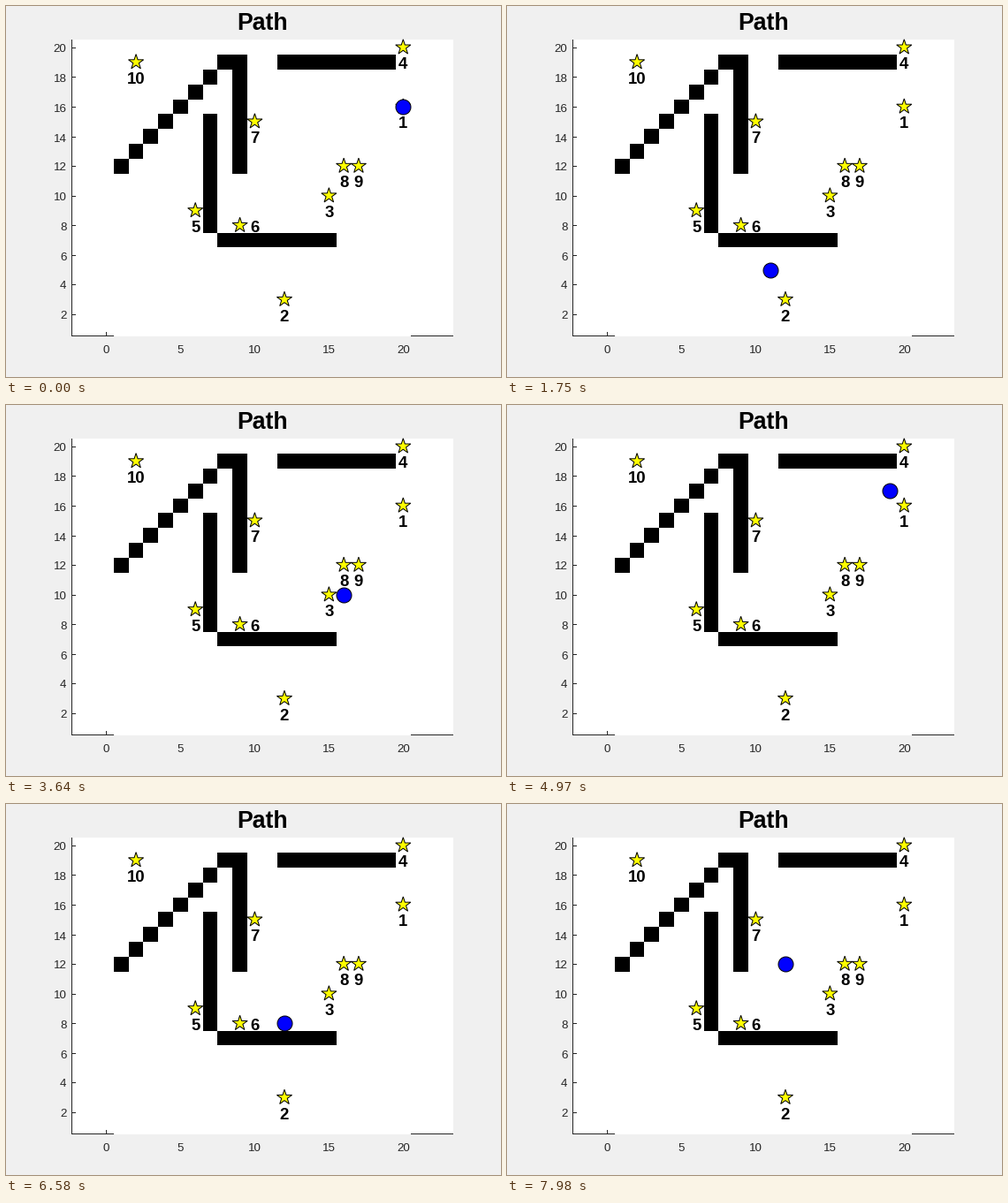
A matplotlib script that plays this animation: 560x420 px, repeating every 8000 ms.

```python
import numpy as np
import matplotlib.pyplot as plt
from matplotlib.animation import FuncAnimation
from matplotlib.patches import Polygon, Rectangle

W, H, DPI = 560, 420, 100
LOOP_MS, TICK_MS, STEP_MS = 8000, 20, 70
CELL = 16.79
INK = "#262626"

GOALS = {1: (20, 16), 2: (12, 3), 3: (15, 10), 4: (20, 20), 5: (6, 9),
         6: (9, 8), 7: (10, 15), 8: (16, 12), 9: (17, 12), 10: (2, 19)}

# Wall runs as first and last cell; the diagonal is added separately.
RUNS = [((8, 19), (9, 19)), ((9, 12), (9, 19)), ((12, 19), (19, 19)),
        ((7, 8), (7, 15)), ((8, 7), (15, 7))]
WALLS = {(x, y) for (x0, y0), (x1, y1) in RUNS
         for x in range(x0, x1 + 1) for y in range(y0, y1 + 1)}
WALLS |= {(x, x + 11) for x in range(1, 8)}


def px(x):
    return 113.5 + CELL * x


def py(y):
    return 382.6 - CELL * y


def walk(start, goal, tie_axis=1):
    """Unit steps that always shorten the longer remaining side first."""
    pos, cells = list(start), []
    while tuple(pos) != goal:
        left = [goal[0] - pos[0], goal[1] - pos[1]]
        axes = sorted((0, 1), key=lambda a: (-abs(left[a]), a != tie_axis))
        for axis in axes:
            nxt = pos.copy()
            nxt[axis] += int(np.sign(left[axis]))
            if left[axis] and tuple(nxt) not in WALLS:
                pos = nxt
                break
        else:
            raise RuntimeError("blocked")
        cells.append(tuple(pos))
    return cells


def build_route():
    route = [GOALS[1]]
    legs = [[GOALS[2]], [GOALS[5]], [(7, 7), (16, 6), GOALS[4]],
            [GOALS[6]], [GOALS[9]], [GOALS[3]], [GOALS[7]]]
    for leg in legs:
        for point in leg:
            tie_axis = 0 if point == GOALS[7] else 1
            route += walk(route[-1], point, tie_axis)
        route.append(route[-1])  # rest for one step at each goal
    return route


ROUTE = build_route()

plt.rcParams["font.family"] = "Liberation Sans"
fig = plt.figure(figsize=(W / DPI, H / DPI), dpi=DPI, facecolor="#f0f0f0")
ax = fig.add_axes([0, 0, 1, 1])
ax.set(xlim=(0, W), ylim=(H, 0))
ax.axis("off")


def pt(pixels):
    return pixels * 72 / DPI


def box(x0, y0, x1, y1, color):
    ax.add_patch(Rectangle((x0, y0), x1 - x0, y1 - y0, facecolor=color,
                           linewidth=0, antialiased=False))


def label(x, y, text, size, ha="center", **style):
    ax.text(x, y, text, fontsize=pt(size), ha=ha, va="baseline", **style)


def star(x, y, radius=9):
    turn = np.arange(10) * np.pi / 5
    r = np.where(np.arange(10) % 2, 0.382 * radius, radius)
    points = np.column_stack([x + r * np.sin(turn), y - r * np.cos(turn)])
    ax.add_patch(Polygon(points, facecolor="yellow", edgecolor="black",
                         linewidth=pt(1), joinstyle="miter", zorder=3))


# Axes: the map area hides the middle of the bottom line.
box(75, 38, 506, 374, "white")
box(74, 38, 75, 374, INK)
box(75, 373, 122, 374, INK)
box(458, 373, 506, 374, INK)
box(113, 369, 114, 373, INK)
for value in range(2, 21, 2):
    y = round(py(value))
    box(75, y, 79, y + 1, INK)
    label(68.5, y + 5.5, value, 13.33, ha="right", color=INK)
for value in range(0, 21, 5):
    label(px(value), 393, value, 13.33, color=INK)
label(290, 27, "Path", 26.67, weight="bold")

for x, y in WALLS:
    box(round(px(x - 0.5)), round(py(y + 0.5)),
        round(px(x + 0.5)), round(py(y - 0.5)), "black")

for number, (x, y) in GOALS.items():
    star(px(x), py(y))
    dx, dy = (1, 0) if number == 6 else (0, -1)
    label(px(x + dx), py(y + dy) + 7.5, number, 18.67, weight="bold", zorder=4)

ball, = ax.plot([], [], "o", markersize=pt(17), markerfacecolor="blue",
                markeredgecolor="black", markeredgewidth=pt(1), zorder=5)


def update(i):
    step = (i * TICK_MS + TICK_MS // 2) // STEP_MS
    x, y = ROUTE[step]
    ball.set_data([px(x)], [py(y)])
    return ball,


anim = FuncAnimation(fig, update, frames=LOOP_MS // TICK_MS,
                     interval=TICK_MS, repeat=True, repeat_delay=0)
plt.show()
```
